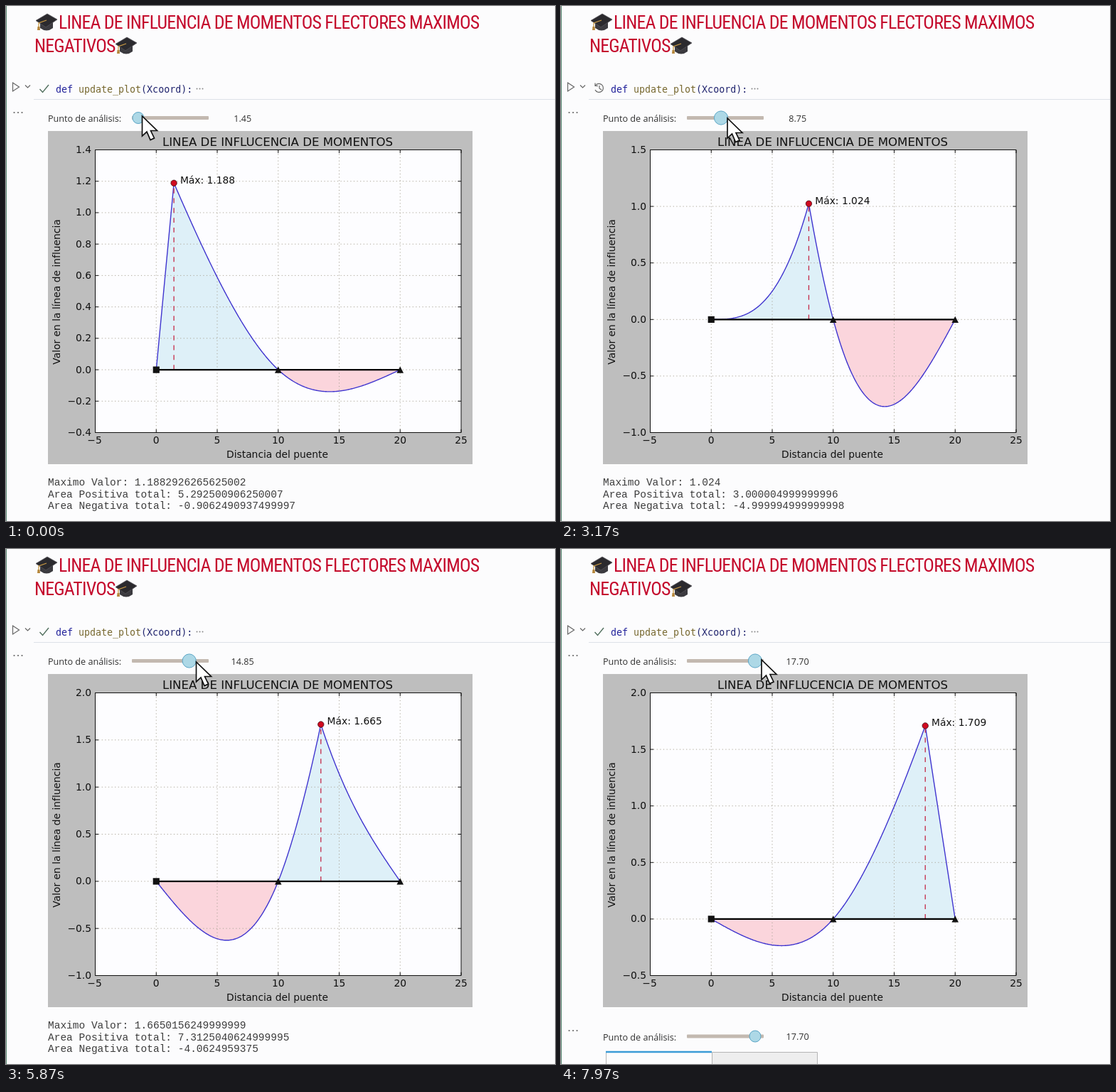
Recreate the animation shown at these times as an HTML page. Size 772 px wide and 725 px high, loop 8000 ms.

```html
<!DOCTYPE html>
<html lang="es">
<head>
<meta charset="utf-8">
<title>Línea de influencia</title>
<style>
  html, body { margin: 0; width: 100%; height: 100%; overflow: hidden; background: #fcfcfd; }
  svg { display: block; }
  text { white-space: pre; }
  .heading { font-family: "Roboto Condensed", "Open Sans Condensed", "Liberation Sans Narrow", "Open Sans", sans-serif;
    font-stretch: 75%; font-size: 28px; letter-spacing: -.03em; fill: #c40a2c; }
  .code { font: 13.3px "DejaVu Sans Mono", monospace; fill: #20246e; }
  .ui { font: 12.6px "Open Sans", sans-serif; fill: #303030; }
  .print { font: 14.5px "Liberation Mono", monospace; fill: #3c3c3c; }
  .plot { font: 13.83px "DejaVu Sans", sans-serif; fill: #111; }
  .title { font-size: 16.6px; }
  .mid { text-anchor: middle; }
  .end { text-anchor: end; }
  .line { fill: none; stroke: #666; stroke-width: 1.2; }
</style>
</head>
<body>
<svg width="772" height="725" viewBox="0 0 772 725">
  <defs>
    <g id="cap">
      <path d="M6 11V20Q15 27 24 20V11Z" fill="#3b3a3f"/>
      <path d="M0 9.5L16 0L30 8L14 19Z" fill="#2b2a2e" stroke="#55545a" stroke-width=".8"/>
      <path d="M15 9L4 13V19" fill="none" stroke="#c99a45" stroke-width="1.3"/>
      <path d="M2.5 18H5.5L6 23H2Z" fill="#b5863a"/>
    </g>
    <g id="dots" fill="#666">
      <circle cx="11.5" r="1.1"/><circle cx="17" r="1.1"/><circle cx="22.5" r="1.1"/>
    </g>
    <g id="track">
      <text class="ui" x="59" y="5.5">Punto de análisis:</text>
      <rect x="177" y="-2.5" width="108" height="5" rx="1" fill="#c3b9b0"/>
    </g>
  </defs>

  <path d="M.5 0V725" stroke="#5d8d78"/>
  <use href="#cap" x="42" y="11"/>
  <text class="heading" id="heading" x="74" y="32">LINEA DE INFLUENCIA DE MOMENTOS FLECTORES MAXIMOS</text>
  <text class="heading" x="40" y="65">NEGATIVOS</text>
  <use href="#cap" x="154" y="44"/>

  <path class="line" d="M9.5 108L18.5 114L9.5 120ZM27 111.5L30.5 115L34 111.5"/>
  <path class="line" id="check" d="M47.5 117L51.5 121.5L60 111" style="stroke:#52705f;stroke-width:1.4"/>
  <g class="line" id="clock">
    <path d="M48.5 112A6 6 0 1 1 48 118M48 108.5V112.5H52M54 112V116L57 118"/>
  </g>
  <text class="code" x="70" y="122"><tspan fill="#20209a">def</tspan> <tspan fill="#77682f">update_plot</tspan>(Xcoord):</text>
  <g fill="#888"><circle cx="268.5" cy="116.5" r="1"/><circle cx="272.5" cy="116.5" r="1"/><circle cx="276.5" cy="116.5" r="1"/></g>
  <path d="M39 131.5H772" stroke="#dce1e8"/>
  <use href="#dots" y="150"/>

  <use href="#track" y="157.5"/>
  <text class="ui mid" id="value" x="332.7" y="163"></text>
  <circle id="handle" cy="157.5" fill="#add8e6" stroke="#5aa5c6"/>

  <rect x="59" y="176" width="597" height="469" fill="#bebebe"/>
  <rect x="125.5" y="202.5" width="514.5" height="398" fill="#fdfdff"/>
  <g class="plot">
    <text class="title mid" x="382" y="197">LINEA DE INFLUCENCIA DE MOMENTOS</text>
    <text class="mid" x="381.5" y="635.5">Distancia del puente</text>
    <text class="mid" transform="translate(76 402.5) rotate(-90)">Valor en la línea de influencia</text>
    <g id="plot"></g>
  </g>

  <g class="print" id="report">
    <text x="59" y="675"></text><text x="59" y="691.5"></text><text x="59" y="708"></text>
  </g>
  <g id="nextCell">
    <use href="#dots" y="678"/>
    <use href="#track" y="686"/>
    <text class="ui mid" x="332.7" y="691">17.70</text>
    <circle cx="273" cy="686" r="8" fill="#add8e6" stroke="#5aa5c6"/>
    <path d="M212.5 725V708.5H360.5V725" fill="#eee" stroke="#b5b5b5"/>
    <path d="M63.5 725V708" stroke="#b5b5b5"/>
    <path d="M63 708H212" stroke="#3b9bd6" stroke-width="2.4"/>
  </g>
  <path id="cursor" d="M0 0V28L6.5 22L11.5 33.5L17 31L12 20.5H21Z" fill="#fff" stroke="#111" stroke-width="1.7"/>
</svg>

<script>
const LOOP = 8000, SPAN = 10, GRID = 2000;
const $ = id => document.getElementById(id);

// time, slider value, cursor x, cursor y
const drag = [
  [0, 1.45, 191.5, 155], [250, 1.45, 194, 156], [1800, 3.6, 207.5, 157], [3170, 8.75, 234, 158],
  [4400, 11.05, 245.5, 158], [5870, 14.85, 267.5, 159], [6500, 16.6, 275.5, 157], [7970, 17.7, 282, 156]
];
// time, analysed section
const updates = [
  [-500, 1.45], [520, 1.7], [900, 2.15], [1260, 2.6], [1500, 2.9], [1770, 3.2], [2060, 4.1],
  [2350, 5.15], [2650, 6.4], [3000, 8], [3200, 8.6], [3500, 9.2], [3800, 9.75], [4050, 10.2],
  [4300, 10.85], [4600, 11.3], [4900, 12.05], [5200, 12.85], [5500, 13.5], [5960, 14.6],
  [6300, 15.6], [6580, 16.3], [6820, 16.75], [7100, 16.95], [7400, 17.2], [7680, 17.4], [7945, 17.55]
];

const supportMoment = x => x * (SPAN ** 2 - x * x) / (4 * SPAN ** 2);

// Moment at section s for a unit load at x on two equal continuous spans.
function influence(x, s) {
  if (s > SPAN) { s = 2 * SPAN - s; x = 2 * SPAN - x; }
  if (x > SPAN) return -s / SPAN * supportMoment(2 * SPAN - x);
  const simple = Math.min(x, s) * (SPAN - Math.max(x, s)) / SPAN;
  return simple - s / SPAN * supportMoment(x);
}

function analyse(s) {
  const xs = Array.from({ length: GRID + 1 }, (_, i) => i / 100);
  const ys = xs.map(x => influence(x, s));
  const peak = ys.reduce((best, y, i) => Math.abs(y) > Math.abs(ys[best]) + 1e-12 ? i : best, 0);
  const area = clip => ys.reduce((sum, y) => sum + clip(y, 0), 0) / 100;
  return { xs, ys, peakX: xs[peak], peakY: ys[peak], positive: area(Math.max), negative: area(Math.min) };
}

function axisRange(ys) {
  const low = Math.min(...ys), high = Math.max(...ys), pad = (high - low) * .05;
  const raw = (high - low + 2 * pad) / 9;
  const step = [.1, .2, .5, 1].find(v => v >= raw);
  return { step, first: Math.floor((low - pad) / step), last: Math.ceil((high + pad) / step) };
}

const label = (v, digits) => v.toFixed(digits).replace("-", "\u2212");
const px = x => 125.5 + (x + 5) * 514.5 / 30;

function drawPlot(s) {
  const { xs, ys, peakX, peakY, positive, negative } = analyse(s);
  const { step, first, last } = axisRange(ys);
  const py = y => 600.5 - (y / step - first) * 398 / (last - first);
  const trace = f => xs.map((x, i) => i % 5 ? "" : `L${px(x).toFixed(2)} ${py(f(ys[i])).toFixed(2)}`).join("").replace("L", "M");
  const zero = py(0), top = py(peakY), cx = px(peakX);
  let grid = "", ticks = "", labels = "";

  for (let x = -5; x <= 25; x += 5) {
    const p = px(x);
    if (x > -5 && x < 25) grid += `M${p} 600.5V202.5`;
    ticks += `M${p} 600.5v-4.6M${p} 202.5v4.6`;
    labels += `<text class="mid" x="${p - (x < 0 ? 1 : 0)}" y="616">${label(x, 0)}</text>`;
  }
  for (let k = first; k <= last; k++) {
    const p = py(k * step);
    if (k > first && k < last) grid += `M125.5 ${p}H640`;
    ticks += `M125.5 ${p}h4.6M640 ${p}h-4.6`;
    labels += `<text class="end" x="120" y="${p + 4.5}">${label(k * step, 1)}</text>`;
  }
  const support = x => `M${px(x)} ${zero - 4.6}l4.8 9.2h-9.6Z`;

  $("plot").innerHTML = `
    <path d="${trace(y => Math.max(y, 0))}Z" fill="#def0f8"/>
    <path d="${trace(y => Math.min(y, 0))}Z" fill="#fbd5dc"/>
    <path d="${grid}" stroke="#aaa496" stroke-dasharray="1.2 3.4" fill="none"/>
    <path d="${trace(y => y)}" fill="none" stroke="#4035cf" stroke-width="1.4"/>
    <path d="M${cx} ${zero}V${top}" stroke="#c52a48" stroke-width="1.3" stroke-dasharray="6.9 6.9"/>
    <path d="M${px(0)} ${zero}H${px(20)}" stroke="#000" stroke-width="2.2"/>
    <path d="M${px(0) - 4.6} ${zero - 4.6}h9.2v9.2h-9.2Z${support(10)}${support(20)}"/>
    <circle cx="${cx}" cy="${top}" r="4.2" fill="#d00a20" stroke="#40101a" stroke-width=".8"/>
    <text x="${cx + 8.8}" y="${top + .5}">Máx: ${peakY.toFixed(3)}</text>
    <path d="M125.5 202.5H640V600.5H125.5Z${ticks}" fill="none" stroke="#111"/>
    ${labels}`;

  const lines = [`Maximo Valor: ${Math.abs(peakY)}`, `Area Positiva total: ${positive}`, `Area Negativa total: ${negative}`];
  lines.forEach((line, i) => { $("report").children[i].textContent = line; });
}

function dragAt(t) {
  const i = drag.findIndex(key => key[0] > t);
  if (i < 0) return drag.at(-1);
  const a = drag[i - 1], b = drag[i], f = (t - a[0]) / (b[0] - a[0]);
  return a.map((v, k) => v + (b[k] - v) * f);
}

const show = (id, on) => { $(id).style.display = on ? "" : "none"; };
let drawn = -1;

function render(t) {
  const [, raw, x, y] = dragAt(t);
  const value = Math.round(raw * 20) / 20;
  $("value").textContent = value.toFixed(2);
  $("handle").setAttribute("cx", 178.2 + 5.354 * value);
  $("handle").setAttribute("r", t < 200 ? 8 : 9.6);
  $("cursor").setAttribute("transform", `translate(${x} ${y})`);

  const current = updates.findLastIndex(u => u[0] <= t);
  if (current !== drawn) drawPlot(updates[drawn = current][1]);
  const next = updates[current + 1];
  const running = !!next && next[0] - t < 50;
  const printed = t - updates[current][0] > 80;
  show("check", !running);
  show("clock", running);
  show("report", printed);
  show("nextCell", !printed && t > 7900);
}

// Pick the heading size that suits whichever condensed face is installed.
const size = Math.min(28, 28 * 592 / $("heading").getComputedTextLength());
document.querySelectorAll(".heading").forEach(el => { el.style.fontSize = size + "px"; });

const start = performance.now();
function tick() {
  render((performance.now() - start) % LOOP);
  requestAnimationFrame(tick);
}
tick();
</script>
</body>
</html>
```
